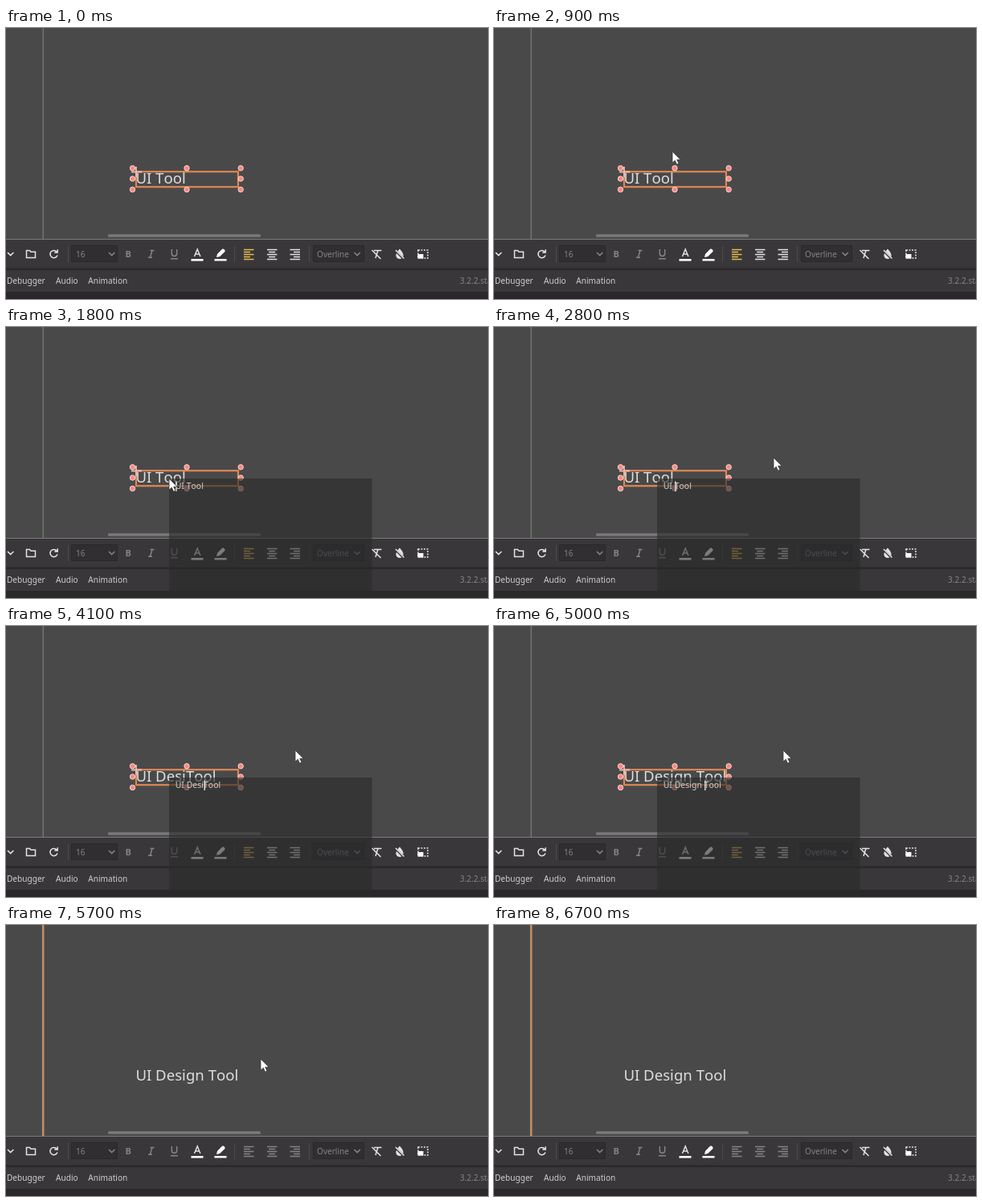
Recreate the animation shown at these times as an HTML page. Size 600x338 px, loop 7.8 s.

```html
<!DOCTYPE html>
<html lang="en">
<head>
<meta charset="utf-8">
<title>Editing a label in place</title>
<style>
  html, body { margin: 0; height: 100%; overflow: hidden; background: #4a494a; }
  svg { display: block; width: 100vw; height: 100vh; }
  text { font: 10.1px "Noto Sans", "Open Sans", sans-serif; font-kerning: none; white-space: pre; fill: #cfcdcf; }
  #label { font-size: 18.6px; fill: #dedddd; }
  #entry { font-size: 10.5px; }
  .dim { fill: #858385; }
  .line { fill: none; stroke: #e4e2e4; stroke-width: 1.5; }
  .off { stroke: #858385; }
  .sep { stroke: #4c4a4d; }
  .box { fill: #302e31; stroke: #2a282b; }
</style>
</head>
<body>
<svg viewBox="0 0 600 338" preserveAspectRatio="none">
  <rect width="600" height="338" fill="#4a494a"/>
  <path id="guide" d="M46.2 0V263"/>
  <rect x="127" y="257.3" width="190" height="3.4" rx="1.5" fill="#7a787a"/>

  <text id="label" x="161.4" y="194.4"></text>
  <g id="selection">
    <rect x="162" y="179.2" width="127" height="19" fill="none" stroke="#dc8852" stroke-width="2.2"/>
    <path d="M156 179.5H169M162 173V186" stroke="#efb9b0" stroke-width="1.8"/>
    <g id="handles" fill="#f98880" stroke="#f7d8d4"></g>
  </g>

  <rect y="263" width="600" height="75" fill="#2a282b"/>
  <rect y="264" width="600" height="35.5" fill="#39373a"/>
  <rect y="302" width="600" height="27" fill="#39373a"/>
  <path d="M0 263.5H600" stroke="#7d797e"/>

  <g id="toolbar">
    <path class="sep" d="M77.5 272V292M284.5 272V292M377.5 272V292"/>
    <path class="line" d="M2 280l3.7 3.6 3.7-3.6"/>
    <path class="line" d="M25.5 277.5h4l1.5 1.7h5.5v7.3h-11z"/>
    <path class="line" d="M63.2 279.2a4.6 4.6 0 1 0 .8 4.2M64.2 276.2v3.9h-3.9"/>

    <rect class="box" x="81.5" y="271.5" width="57" height="20"/>
    <text class="dim" x="87" y="285.5">16</text>
    <path class="line off" d="M128 280l3.7 3.6 3.7-3.6"/>

    <text class="dim" x="148.5" y="285.6" style="font-weight:700;font-size:11px">B</text>
    <path class="line off" d="M179.5 277.5h5M177 286.3h5M182 277.5l-2.6 8.8"/>
    <path class="line off" d="M206.3 276v5.2a3.2 3.2 0 0 0 6.4 0V276M205 287.7h9"/>
    <path class="line" d="M234.5 285l3.7-9 3.7 9M235.8 282h4.8"/>
    <rect x="230.5" y="288" width="15" height="2.6" fill="#fff"/>
    <path d="M262 286l1-4 6-6.2q1.4-1 2.8.4t.6 2.8l-6.2 6zM259.5 288h15v2.6h-15z" fill="#fff"/>

    <g id="aligns" transform="translate(0 .5)">
      <path class="line" d="M296 276h12.5M296 279h8M296 282h12.5M296 285h8M296 288h12.5"/>
      <path class="line" d="M325 276h12.5M327.2 279h8M325 282h12.5M327.2 285h8M325 288h12.5"/>
      <path class="line" d="M353.5 276h12.5M358 279h8M353.5 282h12.5M358 285h8M353.5 288h12.5"/>
    </g>

    <rect class="box" x="382.5" y="271.5" width="63" height="20"/>
    <text class="dim" x="387" y="285.5">Overline</text>
    <path class="line off" d="M433.5 280l3.7 3.6 3.7-3.6"/>

    <path class="line" d="M458 277.5h9.5M463 277.5l-3 9.5M455.5 277l11 11"/>
    <path d="M490 275.5q4.6 5 4.6 8a4.6 4.6 0 0 1-9.2 0q0-3 4.6-8z" fill="#e4e2e4"/>
    <path d="M484.5 277.5l10.5 10.5" stroke="#39373a" stroke-width="2.6"/>
    <path class="line" d="M485 277l10.5 10.5"/>
    <rect class="line" x="513" y="277" width="12" height="10" stroke-dasharray="2 1.5"/>
    <rect x="512.5" y="282" width="7" height="5.5" fill="#fff"/>
  </g>

  <text x="1" y="319">Debugger</text>
  <text x="62" y="319">Audio</text>
  <text x="102.3" y="319">Animation</text>
  <text class="dim" x="565" y="319">3.2.2.stable</text>

  <g id="popup">
    <rect x="203" y="189" width="252.5" height="148" fill="#2a2a2a" fill-opacity=".62"/>
    <text id="entry" x="210.7" y="202.3"></text>
    <rect id="caret" y="192.5" width="1.4" height="12.5" fill="#e8e8e8"/>
  </g>

  <path id="cursor" d="M0 0V14.2L3.3 11.2L5.5 16.2L8 15.1L5.7 10.3H10.2Z"
        fill="#fff" stroke="#333" stroke-width=".8"/>
</svg>
<script>
const LOOP = 7800, STEP = 100;
const OPEN = 1800, CLICK = 2400, CLOSE = 5700, LEAVE = 6700;
const WORD = "Design ";
const KEYS = [3500, 3600, 3700, 3900, 4200, 4400, 5000];

// Pointer path: time, x, y
const PATH = [
  [700, 262, 60], [800, 238, 118], [900, 222, 154], [1000, 212, 172], [1400, 203, 189],
  [2000, 203, 189], [2400, 222, 192], [2500, 222, 192], [2800, 348, 163], [3000, 360, 155],
  [5100, 360, 155], [5600, 317, 167], [5900, 317, 167], [6200, 352, 181],
  [6500, 352, 181], [6600, 502, 141], [LEAVE, 502, 141]
];

const $ = id => document.getElementById(id);
const show = (id, on) => { $(id).style.display = on ? "" : "none"; };
const set = (el, attrs) => { for (const k in attrs) el.setAttribute(k, attrs[k]); };

for (const y of [174.8, 188, 201.5])
  for (const x of [157.5, 225, 292.2]) {
    if (x === 225 && y === 188) continue;
    const dot = document.createElementNS("http://www.w3.org/2000/svg", "circle");
    set(dot, { cx: x, cy: y, r: 3.2 });
    $("handles").append(dot);
  }

const pen = document.createElement("canvas").getContext("2d");
pen.font = '10.5px "Noto Sans", "Open Sans", sans-serif';
pen.fontKerning = "none";

function pointer(t) {
  const i = PATH.findIndex(p => p[0] > t);
  if (i < 1) return null;
  const [t0, x0, y0] = PATH[i - 1], [t1, x1, y1] = PATH[i];
  const k = (t - t0) / (t1 - t0);
  return [x0 + (x1 - x0) * k, y0 + (y1 - y0) * k];
}

function draw(t) {
  const editing = t >= OPEN && t < CLOSE, selected = t < CLOSE;
  const before = "UI " + WORD.slice(0, KEYS.filter(k => k <= t).length);
  const text = before + "Tool";
  $("label").textContent = $("entry").textContent = text;

  show("popup", editing);
  const start = t < CLICK ? 0 : pen.measureText(before).width;
  set($("caret"), { x: 211.2 + start });
  show("caret", t < 3300 || t >= KEYS[0]);

  show("selection", selected);
  set($("guide"), selected ? { stroke: "#7c8e78", "stroke-width": 1 }
                           : { stroke: "#bd8f62", "stroke-width": 2.6 });
  [...$("aligns").children].forEach((icon, i) => {
    icon.style.stroke = !selected ? "#858385" : i ? "#e4e2e4" : "#e8bd4c";
  });

  const at = pointer(t);
  show("cursor", at);
  if (at) set($("cursor"), { transform: `translate(${at})` });
}

function tick() {
  draw(Math.floor(performance.now() % LOOP / STEP) * STEP);
  requestAnimationFrame(tick);
}
tick();
</script>
</body>
</html>
```
